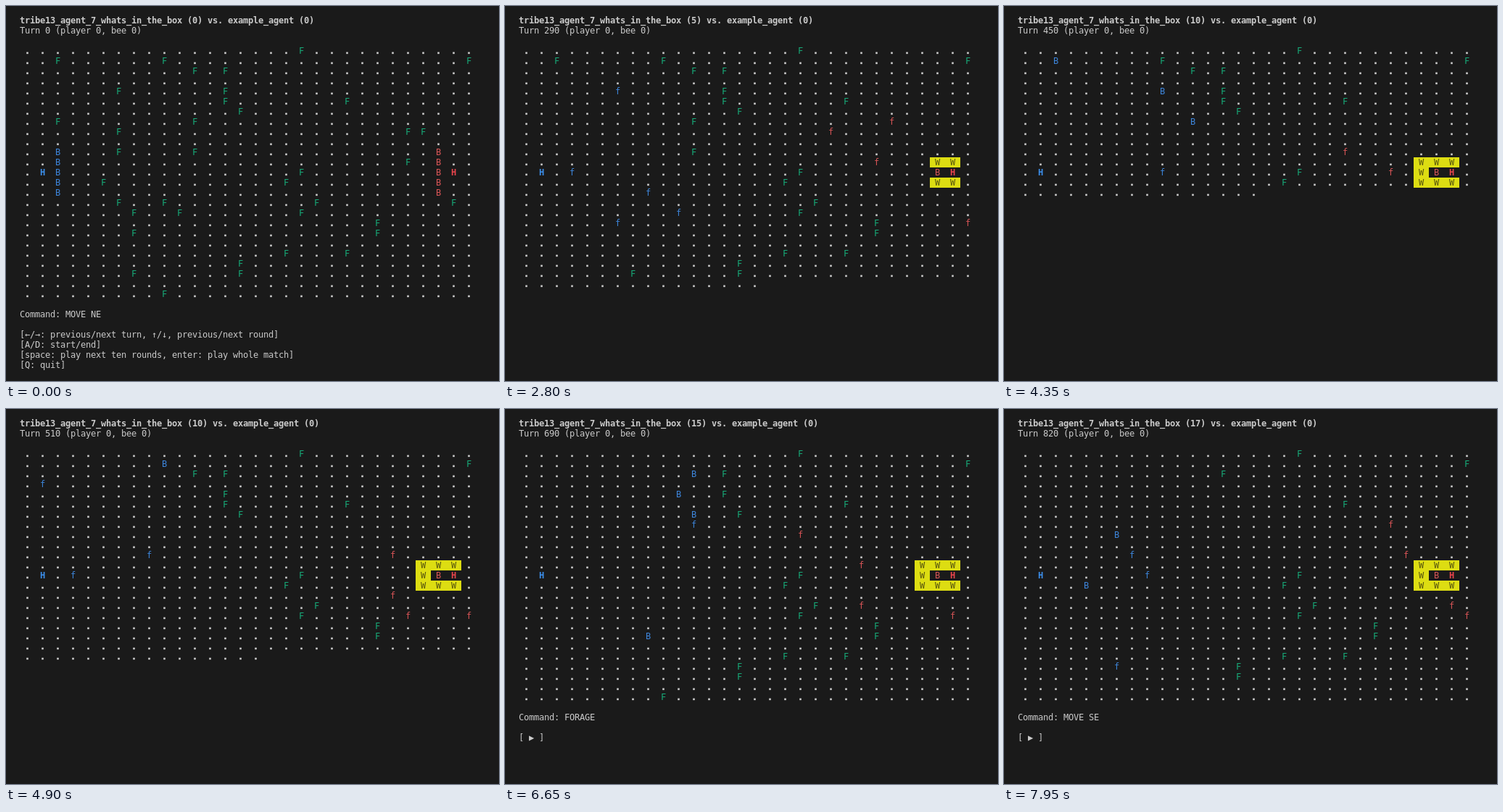
Write an HTML page with a canvas that moves like this. It is 680 px wide and 518 px high and loops after 8 s.

```html
<!DOCTYPE html>
<html lang="en">
<head>
<meta charset="utf-8">
<title>Bee match replay</title>
<style>
  html, body { margin: 0; width: 100%; height: 100%; overflow: hidden; background: #1a1a1a; }
  canvas { display: block; }
</style>
</head>
<body>
<canvas id="screen" width="680" height="518"></canvas>
<script>
const ctx = document.getElementById('screen').getContext('2d');
const LOOP = 8000, TICK = 50, TICKS_PER_ROUND = 1.93, LAST = 83;
const COLS = 30, ROWS = 25, LEFT = 19, TOP = 13, CHAR = 7, LINE = 14;
const BG = '#1a1a1a', TEXT = '#cbcbcb', GREEN = '#17a877', YELLOW = '#dddd12', WALL = '#55530f';
const RIPE_ROUND = 13, FORAGE_ROUNDS = 4, GUARD = 2;

// The starting field: flower columns by row
const flowers = Object.entries({
  0: [18], 1: [2, 9, 29], 2: [11, 13], 4: [6, 13], 5: [13, 21], 6: [14], 7: [2, 11],
  8: [6, 25, 26], 10: [6, 11], 11: [25], 12: [18], 13: [5, 17], 15: [6, 9, 19, 28],
  16: [7, 10, 18], 17: [23], 18: [7, 23], 20: [17, 21], 21: [14], 22: [7, 14], 24: [9]
}).flatMap(([r, cols]) => cols.map(c => ({ c, r: +r, gone: Infinity })));

let seed = 7;
const random = () => (seed = seed * 16807 % 2147483647) / 2147483647;
const steps = (a, b) => Math.max(Math.abs(a.c - b.c), Math.abs(a.r - b.r));
const toward = (a, b) => ({ c: a.c + Math.sign(b.c - a.c), r: a.r + Math.sign(b.r - a.r) });

function makeTeam(hive, beeColumn, color, hiveColor) {
  const bees = Array.from({ length: 5 }, (_, i) => ({ track: [{ c: beeColumn, r: 10 + i, carries: false }] }));
  return { hive, color, hiveColor, bees, deliveries: [] };
}
const blue = makeTeam({ c: 1, r: 12 }, 2, '#3d86dc', '#3b8eea');
const red = makeTeam({ c: 28, r: 12 }, 27, '#d95557', '#e8444c');

// The red nest is walled in twice: first around the hive, later one column further out
const wallRound = c => c > 26 ? 6 : 33;
const inNest = p => p.r > 10 && p.r < 14 && p.c > 25 && p.c < 29;
const isWall = (p, n) => inNest(p) && (p.r !== 12 || p.c === 26) && n >= wallRound(p.c);

function claimFlower(team) {
  const far = f => Math.hypot(f.c - team.hive.c, f.r - team.hive.r);
  const nearest = flowers.filter(f => !f.claimed).sort((a, b) => far(a) - far(b))[0];
  nearest.claimed = true;
  return nearest;
}

function forage(bee, at, n, team, ripe) {
  bee.goal ||= claimFlower(team);
  if (steps(at, bee.goal) > 0) {
    bee.arrived = n;
    return toward(at, bee.goal);
  }
  if (n >= Math.max(bee.arrived + FORAGE_ROUNDS, ripe)) {
    bee.goal.gone = n;
    bee.goal = null;
    bee.carries = true;
  }
  return at;
}

function bringHome(bee, at, n, team) {
  const next = toward(at, team.hive);
  if (steps(next, team.hive) <= 1) {
    bee.carries = false;
    team.deliveries.push(n);
  }
  return next;
}

function wander(at) {
  const options = [];
  for (let dc = -1; dc <= 1; dc++) for (let dr = -1; dr <= 1; dr++) {
    const p = { c: at.c + dc, r: at.r + dr };
    if (p.c > 17 && p.c < COLS && p.r > 5 && p.r < 19 && !inNest(p)) options.push(p);
  }
  return options[Math.floor(random() * options.length)];
}

function moveBlue(bee, at, n) {
  return bee.carries ? bringHome(bee, at, n, blue) : forage(bee, at, n, blue, RIPE_ROUND);
}
function moveRed(bee, at, n) {
  if (bee === red.bees[GUARD]) return at;
  return bee.carries ? wander(at) : forage(bee, at, n, red, 0);
}

for (let n = 1; n <= LAST; n++) {
  const advance = (bee, move) => {
    const next = move(bee, bee.track[n - 1], n);
    bee.track.push({ c: next.c, r: next.r, carries: !!bee.carries });
  };
  [...red.bees].reverse().forEach(bee => advance(bee, moveRed));
  blue.bees.forEach(bee => advance(bee, moveBlue));
}

function command(n) {
  const { track } = blue.bees[2];
  const a = track[n], b = track[n + 1];
  const direction = ['N', '', 'S'][b.r - a.r + 1] + ['W', '', 'E'][b.c - a.c + 1];
  return direction ? 'MOVE ' + direction : 'FORAGE';
}

// Number of cells already printed while a round is being redrawn
function printedCells(n) {
  const smooth = n === 0 || n % 7 === 6 || (n > 53 && n < 63);
  return smooth ? Infinity : (11 + 3 * ((2 * n + 1) % 5)) * COLS + 16;
}

function print(text, line, col = 0, color = TEXT, bold = false) {
  ctx.font = (bold ? 'bold ' : '') + '12px "DejaVu Sans Mono", monospace';
  ctx.fillStyle = color;
  [...text].forEach((ch, i) => ctx.fillText(ch, LEFT + (col + i) * CHAR, TOP + line * LINE + 11));
}

function drawCell(c, r, cell) {
  const x = LEFT + c * 3 * CHAR, y = TOP + (r + 3) * LINE;
  if (!cell) {
    ctx.fillStyle = TEXT;
    ctx.fillRect(x + 9.2, y + 8.6, 2.6, 2.6);
    return;
  }
  if (cell.ch === 'W') {
    ctx.fillStyle = YELLOW;
    ctx.fillRect(x, y, 3 * CHAR, LINE);
  }
  print(cell.ch, r + 3, c * 3 + 1, cell.color, cell.ch === 'H');
}

function board(n) {
  const cells = new Map();
  const put = (p, ch, color) => cells.set(p.r * COLS + p.c, { ch, color });
  for (const f of flowers) if (n < f.gone) put(f, 'F', GREEN);
  for (let c = 26; c < 29; c++) for (let r = 11; r < 14; r++) {
    if (isWall({ c, r }, n)) put({ c, r }, 'W', WALL);
  }
  for (const team of [red, blue]) {
    for (const { track } of team.bees) put(track[n], track[n].carries ? 'f' : 'B', team.color);
    put(team.hive, 'H', team.hiveColor);
  }
  return cells;
}

function draw(time) {
  const tick = Math.floor(time / TICK);
  const n = Math.floor((tick + 0.5) / TICKS_PER_ROUND);
  const start = Math.round(n * TICKS_PER_ROUND);
  const brief = Math.round((n + 1) * TICKS_PER_ROUND) - start < 2;
  const limit = tick === start && !brief ? printedCells(n) : Infinity;
  const score = blue.deliveries.filter(d => d <= n).length;

  ctx.fillStyle = BG;
  ctx.fillRect(0, 0, 680, 518);
  print(`tribe13_agent_7_whats_in_the_box (${score}) vs. example_agent (0)`, 0, 0, TEXT, true);
  print(`Turn ${n * 10} (player 0, bee 0)`, 1);

  const cells = board(n);
  for (let i = 0; i < Math.min(limit, COLS * ROWS); i++) {
    drawCell(i % COLS, Math.floor(i / COLS), cells.get(i));
  }
  if (limit < Infinity) return;

  print('Command: ' + command(n), 29);
  const footer = tick ? ['[ ▶ ]'] : [
    '[←/→: previous/next turn, ↑/↓, previous/next round]',
    '[A/D: start/end]',
    '[space: play next ten rounds, enter: play whole match]',
    '[Q: quit]'
  ];
  footer.forEach((text, i) => print(text, 31 + i));
}

const origin = performance.now();
function frame() {
  draw((performance.now() - origin) % LOOP);
  requestAnimationFrame(frame);
}
draw(0);
requestAnimationFrame(frame);
</script>
</body>
</html>
```
